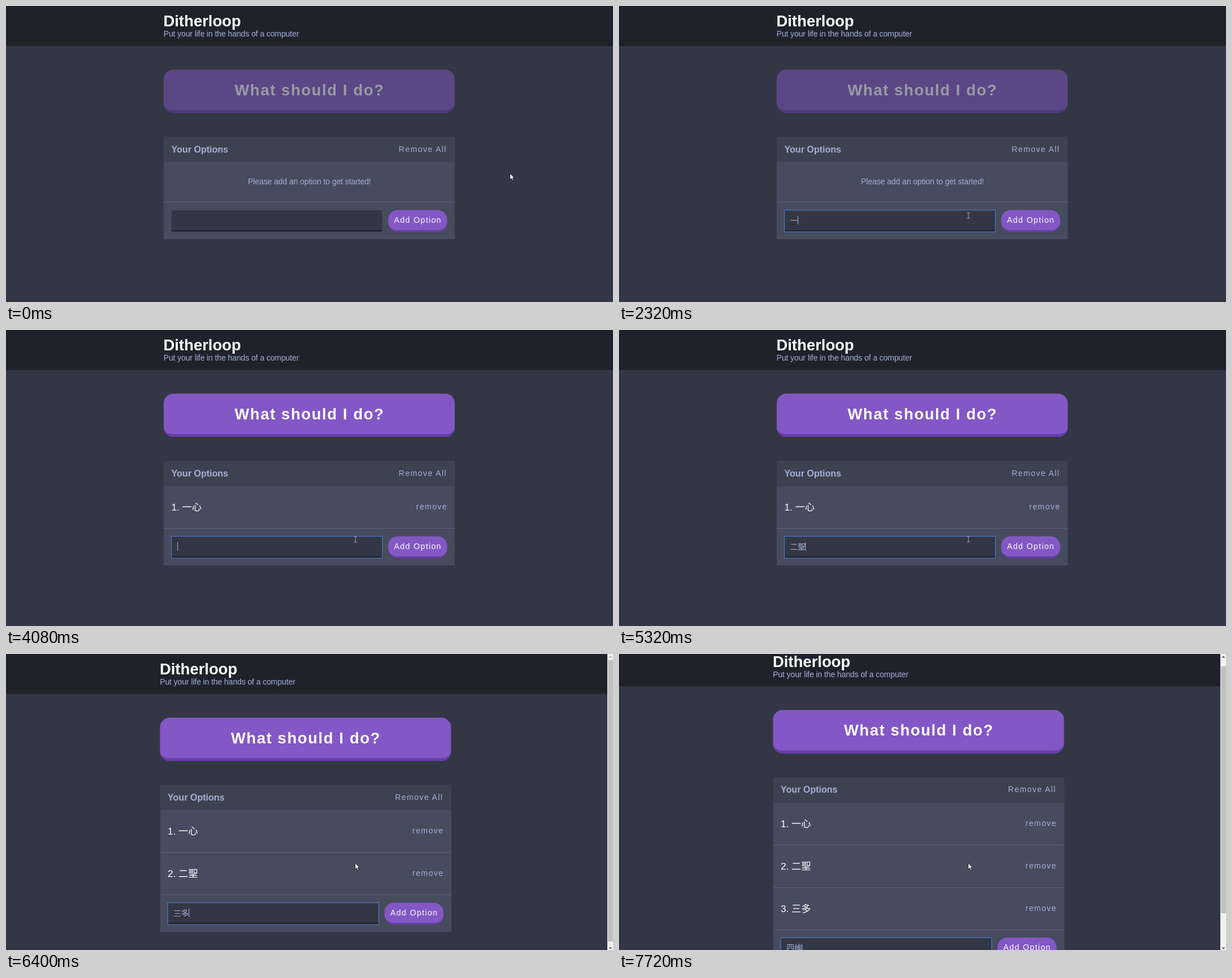
An HTML page for the animation above (8 s loop, 1070 px wide and 523 px high).

```html
<!DOCTYPE html>
<html lang="zh-Hant">
<head>
<meta charset="utf-8">
<title>Ditherloop</title>
<style>
  html, body { margin: 0; width: 100%; height: 100%; overflow: hidden; background: #333745; }
  svg { display: block; width: 1070px; height: 523px; }
  text {
    font-family: "Liberation Sans", Arial, "Noto Sans CJK TC", "Noto Sans CJK", sans-serif;
    font-size: 14px;
    letter-spacing: -.12px;
    fill: #a5afd7;
    white-space: pre;
  }
  .title { font-size: 27.36px; font-weight: bold; letter-spacing: 0; fill: #fff; }
  .heading { font-size: 16px; font-weight: bold; letter-spacing: 0; }
  .spaced { letter-spacing: 1.4px; }
  .title.spaced { letter-spacing: 1.6px; }
  .white { fill: #fff; }
  .option { font-size: 17.1px; letter-spacing: 0; fill: #fff; }
  .entry { font-size: 13.68px; letter-spacing: 0; }
  .crisp { shape-rendering: crispEdges; }
</style>
</head>
<body>
<svg viewBox="0 0 1070 523">
  <g id="page">
    <rect x="-20" y="-20" width="1120" height="90.6" fill="#20222b"/>
    <text class="title" x="277.5" y="36.4">Ditherloop</text>
    <text x="277.7" y="54.3">Put your life in the hands of a computer</text>

    <g id="decide">
      <g class="pill" data-box="278 112.4 513 76.6 17 5"></g>
      <text class="title spaced" x="402.9" y="157.8">What should I do?</text>
    </g>

    <rect class="crisp" id="panel" x="278" y="276" width="513" fill="#464b5e"/>
    <rect class="crisp" x="278" y="231" width="513" height="45" fill="#3d4251"/>
    <text class="heading" x="291.6" y="258.6">Your Options</text>
    <text class="spaced" x="692.3" y="257.8">Remove All</text>

    <text id="empty" x="426.6" y="315.3">Please add an option to get started!</text>
    <g id="rows"></g>

    <g id="form">
      <rect class="crisp" x="278" y="346" width="513" height="1" fill="#5b6079"/>
      <rect x="292" y="361" width="371" height="37.5" fill="#333745"/>
      <rect x="292" y="396" width="371" height="2.5" fill="#20222b"/>
      <rect id="focus" x="291.5" y="360.5" width="372" height="38.5" fill="none" stroke="#4a80d4"/>
      <text class="entry" id="entry" x="301.7" y="383.6"></text>
      <rect class="crisp" id="underline" x="303" y="385" height="1" fill="#14161c"/>
      <rect class="crisp" id="caret" y="371" width="1" height="15" fill="#a5afd7"/>
      <g class="pill" data-box="673.6 360.5 104.1 38.2 17 2.6"></g>
      <text class="white spaced" x="684" y="382.8">Add Option</text>
    </g>
  </g>

  <g id="scrollbar">
    <rect x="1060" width="10" height="523" fill="#f1f1f1"/>
    <rect id="thumb" x="1061" width="9" fill="#c1c1c1"/>
    <path id="up" d="M1062.5 6.5l3-3 3 3z"/>
    <path d="M1062.5 518.5l3 3 3-3z" fill="#505050"/>
  </g>

  <path id="arrow" d="M0 0V10.8L2.5 8.5 4.1 12.2 5.9 11.4 4.3 7.8H7.6Z"
        fill="#fff" stroke="#15161b" stroke-width=".8"/>
  <path id="beam" d="M-2.5 -5H-.5L0 -4.5.5 -5H2.5M0 -4.5V4.5M-2.5 5H-.5L0 4.5.5 5H2.5"
        fill="none" stroke="#b9bbc2" stroke-width=".9"/>
</svg>
<script>
const LOOP = 8000, EM = 13.68;
const $ = id => document.getElementById(id);
const show = (el, on) => { el.style.display = on ? "" : "none"; };
const move = (el, x, y) => el.setAttribute("transform", `translate(${x} ${y})`);

// Rounded button with a darker bottom border
for (const el of document.querySelectorAll(".pill")) {
  const [x, y, w, h, r, b] = el.dataset.box.split(" ").map(Number);
  const flat = w - 2 * r, low = r - b;
  el.innerHTML = `
    <rect x="${x}" y="${y}" width="${w}" height="${h}" rx="${r}" fill="#8357c5"/>
    <path fill="#693cab" d="M${x} ${y + h - r}a${r} ${r} 0 0 0 ${r} ${r}h${flat}
      a${r} ${r} 0 0 0 ${r} ${-r}a${r} ${low} 0 0 1 ${-r} ${low}
      h${-flat}a${r} ${low} 0 0 1 ${-r} ${-low}z"/>`;
}

const rows = ["一心", "二聖", "三多"].map((name, i) => {
  const row = document.createElementNS("http://www.w3.org/2000/svg", "g");
  const line = i ? '<rect class="crisp" x="278" y="275" width="513" height="1" fill="#5b6079"/>' : "";
  row.innerHTML = `${line}
    <text class="option" x="291.6" y="319.2">${i + 1}. ${name}</text>
    <text class="spaced" x="723.1" y="317">remove</text>`;
  move(row, 0, 75 * i);
  $("rows").append(row);
  return row;
});

const ADDED = [4080, 5480, 6960];
const FOCUS = 840, SCROLL = 7360;

// time, entry text, caret visible, composing
const TYPING = [
  [0, "", 0, 0], [FOCUS, "", 1, 0], [1280, "", 0, 0],
  [1520, "u", 1, 0], [2000, "", 1, 0], [2080, "", 0, 0],
  [2320, "一", 1, 1], [2840, "一", 0, 1], [3000, "一", 1, 1],
  [3160, "一ㄒ", 1, 1], [3320, "一ㄒㄧㄣ", 1, 1], [3400, "一心", 1, 1], [3920, "一心", 1, 0],
  [4080, "", 1, 0],
  [4480, "ㄦ", 1, 1], [4640, "二", 1, 1], [4720, "二ㄕ", 1, 1],
  [4800, "二ㄕㄥ", 1, 1], [4880, "二聖", 1, 1], [5320, "二聖", 1, 0],
  [5480, "", 1, 0],
  [5880, "ㄙ", 1, 1], [5960, "ㄙㄢ", 1, 1], [6120, "三", 1, 1], [6200, "三ㄉㄨ", 1, 1],
  [6320, "三ㄉㄨㄛ", 1, 1], [6400, "三多", 1, 1], [6720, "三多", 1, 0],
  [6960, "", 1, 0],
  [7360, "ㄙ", 1, 1], [7440, "四", 1, 1], [7520, "四ㄨ", 1, 1],
  [7600, "四ㄨㄟ", 1, 1], [7720, "四維", 1, 0]
];

function drawEntry(t) {
  const [, text, caret, composing] = TYPING.findLast(step => step[0] <= t);
  const width = [...text].reduce((sum, c) => sum + (c < "z" ? EM * 0.556 : EM), 0);
  $("entry").textContent = text;
  $("caret").setAttribute("x", Math.max(302, Math.floor(301.5 + width)));
  show($("caret"), caret);
  $("underline").setAttribute("width", Math.max(0, Math.round(width - 2)));
  show($("underline"), composing);
}

function drawPointer(t, count) {
  let x = 888.5, y = 296;
  if (t >= 80) { x = 890.5; y = 295.5; }
  if (t >= 280) {
    const tick = 280 + Math.floor((t - 280) / 80) * 80;
    const p = Math.min(1, (tick - 200) / 720);
    const ease = p * p * (3 - 2 * p);
    x += (616 - x) * ease;
    y += (370 - y) * ease;
  }
  const typing = count < 2 && y > 360.5 && x < 664;
  show($("beam"), typing);
  show($("arrow"), !typing);
  move($("beam"), x, y);
  move($("arrow"), count < 2 ? x : 615.5, count < 2 ? y : 369.5);
}

function drawScrollbar(count, scrolled) {
  show($("scrollbar"), count > 1);
  $("thumb").setAttribute("y", scrolled ? 21.5 : 10.5);
  $("thumb").setAttribute("height", count > 2 ? 436.5 : 497.5);
  $("up").setAttribute("fill", scrolled ? "#505050" : "#a3a3a3");
}

function draw(now) {
  const t = now % LOOP;
  const count = ADDED.filter(time => time <= t).length;
  const scrolled = t >= SCROLL;
  const drop = count ? 75 * count - 71 : 0;

  move($("page"), count > 1 ? -6.5 : 0, scrolled ? -13.4 : 0);
  move($("form"), 0, drop);
  $("panel").setAttribute("height", 136 + drop);
  $("decide").setAttribute("opacity", count ? 1 : 0.5);
  show($("empty"), !count);
  rows.forEach((row, i) => show(row, i < count));
  show($("focus"), t >= FOCUS);
  drawEntry(t);
  drawPointer(t, count);
  drawScrollbar(count, scrolled);
}

function loop() {
  draw(performance.now());
  requestAnimationFrame(loop);
}
loop();
</script>
</body>
</html>
```
